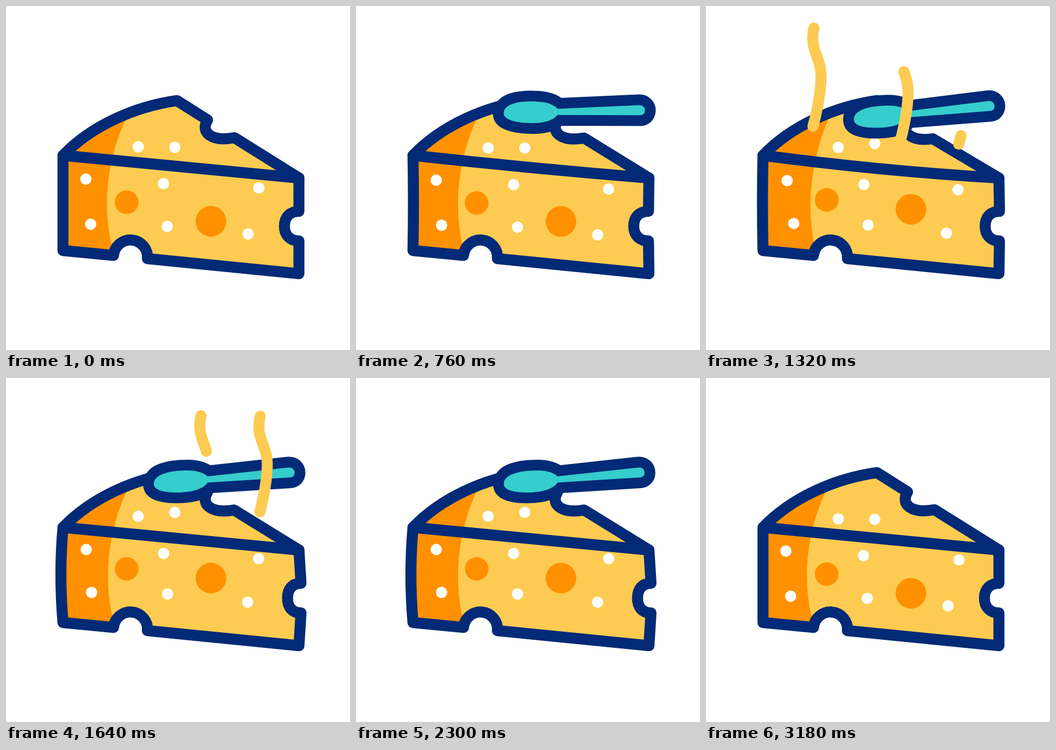
These frames come from a looping animation (640 px wide and 640 px high, 3520 ms). An HTML page with a canvas:

```html
<!DOCTYPE html>
<html lang="en">
<head>
<meta charset="utf-8">
<title>Cheese</title>
<style>
  html, body { margin: 0; width: 100%; height: 100%; overflow: hidden; background: #fff; }
  canvas { display: block; width: 100vmin; height: 100vmin; }
</style>
</head>
<body>
<canvas id="stage" width="640" height="640"></canvas>
<script>
const ctx = document.getElementById('stage').getContext('2d');
const LOOP = 3520, STEP = 20, LINE = 20.5;
const NAVY = '#032a76', YELLOW = '#fdcb51', ORANGE = '#ff9100', TEAL = '#35cdcd';

const clamp = u => Math.min(1, Math.max(0, u));
// Eased step from 0 to 1, and a soft hump from 0 to 1 and back
const ramp = (t, from, to) => (1 - Math.cos(Math.PI * clamp((t - from) / (to - from)))) / 2;
const hump = (t, from, to) => Math.sin(Math.PI * clamp((t - from) / (to - from))) ** 2;

function pose(t) {
  const push = hump(t, 1000, 1640);
  const hop = hump(t, 2400, 2680);
  const touch = ramp(t, 480, 780) - ramp(t, 2300, 2540);
  const away = 1 - ramp(t, 260, 740) + ramp(t, 2460, 3190);
  const raised = 1 - ramp(t, 500, 760) + ramp(t, 2440, 2780);
  const level = 1 - ramp(t, 780, 1320) + 0.62 * ramp(t, 2440, 2780);
  return {
    press: 0.3 * touch + 0.7 * push,
    lift: 1.1 * ramp(t, 900, 1640) - 0.1 * touch + 0.7 * hump(t, 1640, 2100)
      + 0.45 * hump(t, 2300, 2580) - 1.1 * ramp(t, 2360, 3180),
    x: 400 * away,
    y: 5 * level - 7 * raised + 13.5 * push - 25 * hop,
    turn: 3.7 * level - 0.9 * push - 12 * hop
  };
}

// x, y and how far each spot rises with the lift
const dots = [
  [246, 262, 6], [314, 263, 13],
  [148.5, 322, 4.5], [293, 330.5, 5.5], [470.5, 338.5, 4],
  [157.5, 406, 8], [300, 410, 9], [450.5, 424, 8]
];

function spot(x, y, rise, r, color, { press, lift }) {
  ctx.fillStyle = color;
  ctx.beginPath();
  ctx.arc(x, y + (8 - 0.6 * rise) * press - rise * lift, r, 0, 7);
  ctx.fill();
}

function cheese(p) {
  const s = p.press, bulge = 4.3 * p.lift - 1.5 * s;
  const left = 106 - 2 * bulge, lip = 545 + bulge, bite = 518 + 1.5 * bulge;

  const body = new Path2D(
    `M106 278 C160 222 240 187 318 176 L375 212
     C360 236 384 253 ${425 - 3 * s} ${245 + 2 * s} L545 320
     L${lip} 382 C${lip - 17} 382 ${bite} 393 ${bite} 409.5 C${bite} 426 ${lip - 17} 437 ${lip} 437
     L545 498 L263 470 A31 31 0 1 0 200 464 L106 455 Q${left} 366 106 278 Z`);
  const shade = new Path2D(
    `M90 200 L${227 + 4 * s} 203 C${192 + 8 * s} 270 ${173 + 8 * s} 372 ${202 + 4 * s} 464 L90 480 Z`);
  const seam = new Path2D(`M106 278 Q326 ${299 + 10 * s - 3.5 * p.lift} 545 320`);

  ctx.fillStyle = YELLOW;
  ctx.fill(body);
  ctx.save();
  ctx.clip(body);
  ctx.fillStyle = ORANGE;
  ctx.fill(shade);
  ctx.restore();

  spot(224.5, 365, 10.5, 22, ORANGE, p);
  spot(381.3, 400.5, 26, 28.5, ORANGE, p);
  // Dots squeeze towards the middle, more so lower down
  for (const [x, y, rise] of dots) {
    spot(x + (355 - x) * (y - 262) * 0.0002 * s, y, rise, 10.5, '#fff', p);
  }

  ctx.strokeStyle = NAVY;
  ctx.lineWidth = LINE;
  ctx.stroke(body);
  ctx.stroke(seam);
}

const spoonShape = new Path2D(
  `M275 197 C275 180 302 172 338 172 C358 172 368 177 375 183 L526 166.5
   C532 166 537 170 537 176 C537 182 533 185 528 185 L375 194.5
   C367 207 345 213 318 213 C292 213 275 208 275 197 Z`);

function spoon({ x, y, turn }) {
  ctx.save();
  ctx.translate(324 + x, 192 + y);
  ctx.rotate(turn * Math.PI / 180);
  ctx.translate(-324, -192);
  ctx.strokeStyle = NAVY;
  ctx.lineWidth = 40;
  ctx.stroke(spoonShape);
  ctx.fillStyle = TEAL;
  ctx.fill(spoonShape);
  ctx.restore();
}

const cubic = (a, b, c, d, u) => {
  const w = 1 - u;
  return a * w * w * w + 3 * b * w * w * u + 3 * c * w * u * u + d * u * u * u;
};
// Two curves end to end, u from foot to tip
const wave = u => u < 0.52
  ? [cubic(198, 206, 214, 214, u / 0.52), cubic(227, 200, 160, 130, u / 0.52)]
  : [cubic(214, 214, 191, 201, (u - 0.52) / 0.48), cubic(130, 95, 80, 41, (u - 0.52) / 0.48)];

// A strand grows from its foot, then is trimmed from the foot upward
function strand(x, y, t) {
  const grow = 340, from = ramp(t, grow, 2 * grow), to = ramp(t, 0, grow);
  if (to - from < 0.001) return;
  ctx.beginPath();
  for (let i = 0; i <= 50; i++) {
    const [px, py] = wave(from + (to - from) * i / 50);
    ctx.lineTo(px + x, py + y);
  }
  ctx.strokeStyle = YELLOW;
  ctx.lineWidth = LINE;
  ctx.stroke();
}

function draw(t) {
  ctx.fillStyle = '#fff';
  ctx.fillRect(0, 0, 640, 640);
  ctx.lineJoin = ctx.lineCap = 'round';
  const p = pose(t);
  cheese(p);
  spoon(p);
  strand(0, 0, t - 950);
  strand(162, 29, t - 1100);
  strand(272, 30, t - 1252);
}

const start = performance.now();
function tick() {
  const t = (performance.now() - start) % LOOP;
  draw(Math.floor(t / STEP) * STEP);
  requestAnimationFrame(tick);
}
tick();
</script>
</body>
</html>
```
